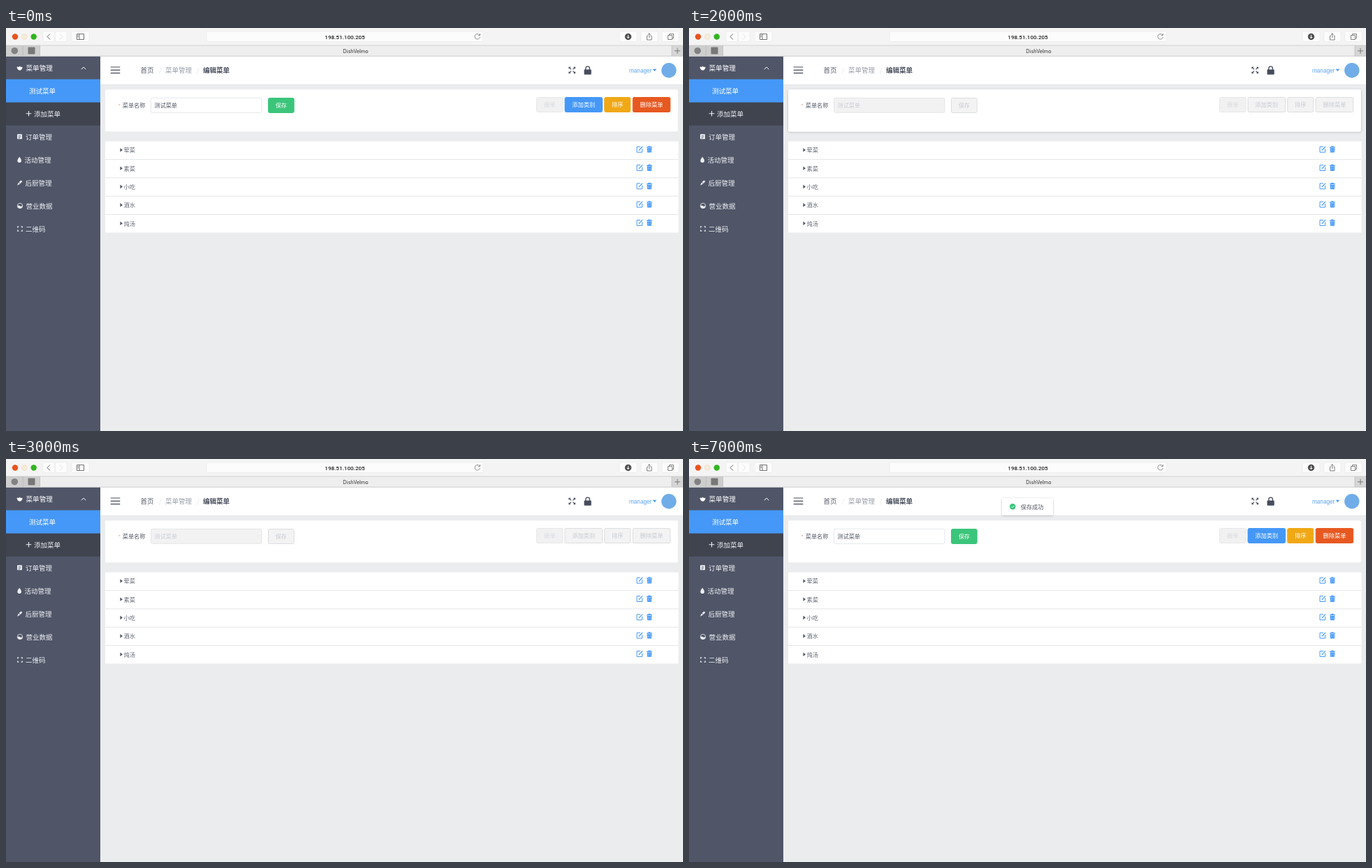
An HTML page for the animation above (8 s loop, 969 by 578 pixels).

```html
<!DOCTYPE html>
<html lang="zh-CN">
<head>
<meta charset="utf-8">
<title>菜单管理</title>
<style>
html, body { margin: 0; width: 100%; height: 100%; overflow: hidden; }
svg { display: block; width: 969px; height: 578px; font-family: "Noto Sans CJK SC", "Noto Sans CJK", sans-serif; }
.latin { font-family: Roboto, sans-serif; font-weight: 500; }
.title { font-family: Inter, sans-serif; }
.user { font-family: "Liberation Sans", sans-serif; }
</style>
</head>
<body>
<svg id="stage" viewBox="0 0 969 578"></svg>
<script>
const LOOP = 8000;
const BLUE = '#4598f7', GREEN = '#3bc57b', AMBER = '#f0a815', RED = '#e75920', DARK = '#464c5b';

const rect = (x, y, w, h, fill, attrs = '') =>
  `<rect x="${x}" y="${y}" width="${w}" height="${h}" fill="${fill}" ${attrs}/>`;
const circle = (x, y, r, fill, attrs = '') =>
  `<circle cx="${x}" cy="${y}" r="${r}" fill="${fill}" ${attrs}/>`;
const line = (d, color, width = 1, attrs = '') =>
  `<path d="${d}" fill="none" stroke="${color}" stroke-width="${width}" ${attrs}/>`;
const shape = (d, fill) => `<path d="${d}" fill="${fill}"/>`;
// y is the vertical middle of the text
const text = (x, y, label, size, fill, attrs = '') =>
  `<text x="${x}" y="${y + size * 0.37}" font-size="${size}" fill="${fill}" ${attrs}>${label}</text>`;
const middle = 'text-anchor="middle"';
const group = (id, content) => `<g id="${id}">${content}</g>`;

function button(x, y, w, label, fill, color = '#fff', border = fill) {
  return rect(x + .5, y + .5, w - 1, 21, fill, `rx="2" stroke="${border}"`) +
    text(x + w / 2, y + 11, label, 8.2, color, middle);
}
const disabledButton = (x, y, w, label) => button(x, y, w, label, '#f3f3f4', '#c8cbd1', '#dcdddf');

function browser() {
  const tool = (x, w) => rect(x, 5, w, 14.5, '#fcfcfc', 'rx="2" stroke="#e9e8e9" stroke-width=".6"');
  const ink = '#626262';
  return rect(0, 0, 969, 25, '#f5f4f5') +
    circle(13, 12.5, 4.2, '#e9531d') +
    circle(26.3, 12.5, 3.9, '#f5ecd9', 'stroke="#ecdcc0" stroke-width=".7"') +
    circle(39.7, 12.5, 4.2, '#30b51f') +
    tool(53, 16.5) + tool(70.5, 16.5) + tool(94, 25) + tool(287, 396) +
    tool(878, 25) + tool(909, 24) + tool(939, 24) +
    line('M63 8.5L59 12.5L63 16.5', ink) + line('M77 8.5L81 12.5L77 16.5', '#e2e2e2') +
    line('M101.5 8.5H111.5V16.5H101.5ZM105 8.5V16.5M102.5 10.5H104M102.5 12.5H104', ink, .9) +
    text(485, 12.7, '198.51.100.205', 8.1, '#222', middle + ' class="latin"') +
    line('M678 10.2A3.8 3.8 0 1 0 678.5 13M678.4 8V10.7H675.7', '#777', .8) +
    circle(890.5, 12.5, 4.7, '#4e4e4e') +
    line('M890.5 9.8V14.6M888.4 12.7L890.5 14.8L892.6 12.7', '#fff') +
    line('M919 11.2H917.5V17H924V11.2H922.5M920.7 14V7.8M918.8 9.6L920.7 7.6L922.6 9.6', ink, .8) +
    line('M947.5 10.5H953.5V16.5H947.5ZM949.5 10V8.5H955.5V14.5H954', ink, .8) +
    rect(0, 25, 969, 15.5, '#efeeef') +
    rect(0, 25, 48.5, 15.5, '#cfcecf') + rect(953, 25, 16, 15.5, '#d7d6d7') +
    line('M0 25H969M0 40.3H969', '#c4c3c4', .7) + line('M24.3 25V40M48.5 25V40M953 25V40', '#b8b7b8', .7) +
    circle(12.3, 32.7, 4.8, '#828282') + rect(31.5, 27.5, 10, 10, '#777', 'rx="1"') +
    text(500.5, 32.8, 'DishVelmo', 7.3, '#333', middle + ' class="title"') +
    line('M957 32.8H965M961 28.8V36.8', '#707070', .9);
}

function sidebar() {
  const ink = '#edeff3';
  const items = [[28, 156, '订单管理'], [26.5, 189, '活动管理'], [27.5, 222, '后厨管理'],
    [28.5, 255, '营业数据'], [28, 288, '二维码']];
  return rect(0, 40.5, 135, 538, '#505668') +
    rect(0, 73.5, 135, 33.3, BLUE) + rect(0, 106.8, 135, 33, '#40444f') +
    text(28.5, 57, '菜单管理', 9.6, '#fff', 'font-weight="500"') +
    line('M107.7 59.3L111 56L114.3 59.3', '#fff', 1) +
    text(33, 90, '测试菜单', 9.5, '#fff') +
    text(40, 123, '添加菜单', 9.5, ink) + line('M28.7 122.8H36.3M32.5 119V126.6', ink, 1.1) +
    items.map(([x, y, label]) => text(x, y, label, 9.5, ink)).join('') +
    shape('M15.5 56Q17.5 55 18 56.5L19.5 54.5L21 56Q23.7 55 23.5 57Q22.5 60.5 19.5 60.7Q16.5 60.5 15.5 56Z', '#fff') +
    rect(16, 152.3, 7, 7, ink, 'rx=".8"') +
    line('M17.7 154.6H21.4M17.7 156.4H21.4M17.7 158H20', '#505668', .7) +
    shape('M19.2 184.7Q22 188 22 190.2A2.8 2.8 0 0 1 16.4 190.2Q16.4 188 19.2 184.7Z', ink) +
    shape('M16 225.8L18 221.6L20.2 223.6ZM18.6 221L21.5 218.5L23.3 220L20.8 223Z', ink) +
    circle(20, 255, 3.7, 'none', `stroke="${ink}" stroke-width=".8"`) +
    shape('M16.3 255Q18 253.8 20 255.2T23.7 254.7A3.7 3.7 0 0 1 16.3 255Z', ink) +
    line('M18.3 284.9H16.7V286.5M21.7 284.9H23.3V286.5M16.7 289.5V291.1H18.3M23.3 289.5V291.1H21.7', ink, 1.1);
}

function header() {
  const bars = [56, 60.3, 64.6].map(y => `M149.7 ${y}H163.3`).join('');
  const arrows = [[1, 1], [-1, 1], [1, -1], [-1, -1]].map(([sx, sy]) =>
    `<g transform="translate(810.2 60.5) scale(${sx} ${sy})">` +
    line('M1.2 1.2L4 4', DARK, 1.1) + shape('M4.8 1.8V4.8H1.8Z', DARK) + '</g>').join('');
  return rect(135, 40.5, 834, 40.5, '#fff') + line('M135 81.2H969', '#e3e4e7', .7) +
    line(bars, DARK, 1.2) +
    text(192.5, 60.5, '首页', 9.5, '#595f6b') + text(219, 60.3, '/', 9, '#dcdee2') +
    text(228, 60.5, '菜单管理', 9.5, '#999fa9') + text(273, 60.3, '/', 9, '#dcdee2') +
    text(282, 60.5, '编辑菜单', 9.5, DARK, 'font-weight="600"') +
    arrows + rect(827.5, 59.5, 10.2, 7.2, DARK, 'rx=".9"') +
    line('M829.8 60V58A2.8 2.8 0 0 1 835.4 58V60', DARK, 1.3) +
    text(892, 61, 'manager', 8.2, '#5ba3f1', 'class="user"') +
    shape('M925.6 58.8H931.2L928.4 62.2Z', '#4f9cf0') +
    circle(948.8, 60.8, 10.7, '#70ade8');
}

function form() {
  const input = (fill, border, color) =>
    rect(207.5, 100.3, 158.5, 21, fill, `rx="2" stroke="${border}" stroke-width=".8"`) +
    text(212.3, 111, '测试菜单', 8.2, color);
  return group('raised', rect(142, 88.5, 820, 60, '#fff', 'rx="2" filter="url(#lift)"')) +
    rect(142, 88.3, 819.7, 60.2, '#fff', 'rx="2"') +
    text(160.5, 111, '*', 7, '#ee9a86') + text(166.7, 110.5, '菜单名称', 8.2, '#555b67') +
    button(759, 99, 38.5, '撤单', '#f1f1f2', '#d9dbdf', '#e7e7e9') +
    group('active', input('#fff', '#dfe1e6', '#555b67') + button(375, 100, 37.7, '保存', GREEN) +
      button(799.5, 99, 54.5, '添加类别', BLUE) + button(856.2, 99, 38, '排序', AMBER) +
      button(896.7, 99, 54.5, '删除菜单', RED)) +
    group('busy', input('#f2f2f3', '#e0e1e4', '#cdcfd4') + disabledButton(375, 100, 37.7, '保存') +
      disabledButton(799.5, 99, 54.5, '添加类别') + disabledButton(856.2, 99, 38, '排序') +
      disabledButton(896.7, 99, 54.5, '删除菜单'));
}

function rows() {
  const row = (label, i) => `<g transform="translate(0 ${i * 26.3})">` +
    (i ? line('M142 162.3H962', '#e4e5e8', 1) : '') +
    shape('M163.4 172.2L167 175L163.4 177.8Z', '#555b67') +
    text(168.5, 175.3, label, 8.2, '#626874') +
    line('M908 170.3H903V178.2H910.6V173.2', BLUE, 1) + line('M905.8 175.6L911 170', BLUE, 1.2) +
    rect(917, 170.4, 7.8, 1.3, BLUE) + rect(919.2, 169.3, 3.4, 1.3, BLUE) +
    shape('M917.5 172.3H924.3L923.8 178.6H918Z', BLUE) +
    line('M919.6 173.6V177.4M922.2 173.6V177.4', '#d4e6fd', .6) + '</g>';
  return rect(142, 162.5, 820.5, 131, '#fff', 'rx="1"') +
    ['荤菜', '素菜', '小吃', '酒水', '炖汤'].map(row).join('');
}

const toast = () => group('toast',
  rect(448, 56.3, 73, 24.3, '#fff', 'rx="2" filter="url(#lift)"') +
  circle(463.2, 68.3, 4.2, GREEN) + line('M461.2 68.3L462.7 69.8L465.3 67', '#fff', .9) +
  text(474.7, 68.5, '保存成功', 8.2, '#555b67'));

const stage = document.getElementById('stage');
stage.innerHTML =
  `<defs><filter id="lift" x="-10%" y="-30%" width="120%" height="170%">
    <feDropShadow dx="0" dy=".7" stdDeviation="1.7" flood-color="#000" flood-opacity=".25"/></filter></defs>` +
  rect(0, 0, 969, 578, '#ebecee') + header() + sidebar() + browser() + form() + rows() + toast();

const show = (id, on) => stage.querySelector('#' + id).setAttribute('visibility', on ? 'visible' : 'hidden');

function draw(now) {
  const t = now % LOOP;
  const busy = t >= 2000 && t < 6000;
  show('raised', t >= 1000 && t < 3000);
  show('active', !busy);
  show('busy', busy);
  show('toast', t >= 6000);
}

const start = performance.now();
function tick() {
  draw(performance.now() - start);
  requestAnimationFrame(tick);
}
tick();
</script>
</body>
</html>
```
